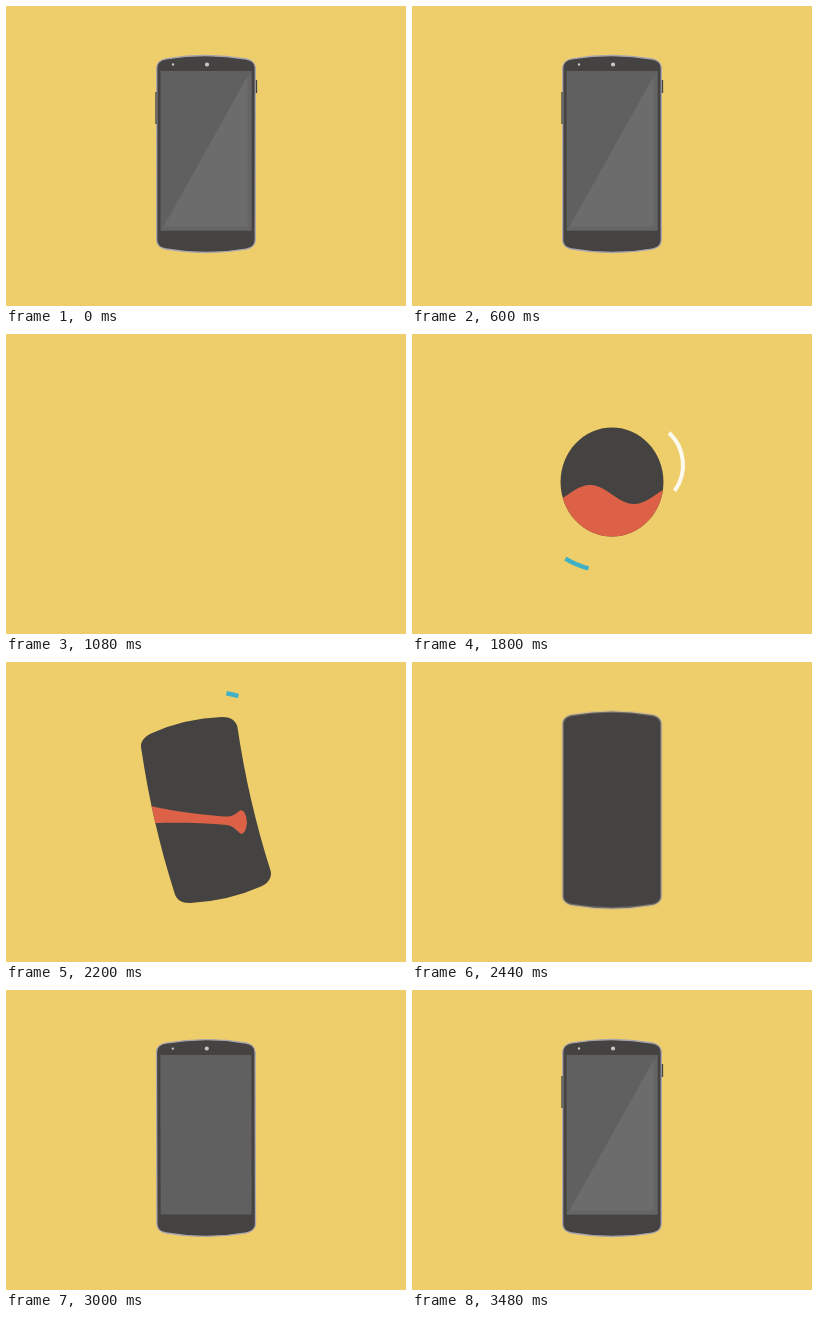
Recreate the animation shown at these times as an HTML page with a canvas. Size 400 by 300 pixels, loop 3600 ms.

```html
<!DOCTYPE html>
<html>
<head>
<meta charset="utf-8">
<style>
html, body { margin: 0; height: 100%; overflow: hidden; background: #eece6b; }
canvas { display: block; }
</style>
</head>
<body>
<canvas id="stage" width="400" height="300"></canvas>
<script>
const ctx = document.getElementById('stage').getContext('2d');
const LOOP = 3600, STEP = 40;
const DARK = '#454341', RED = '#dd6147', BLUE = '#3fb0c6', WHITE = '#fcf9ee';
const { PI, sin, cos, exp, sqrt, max, min, abs } = Math;
const rad = PI / 180;

const span = (t, a, b) => min(1, max(0, (t - a) / (b - a)));
const mix = (a, b, p) => a + (b - a) * p;
const smooth = p => p * p * (3 - 2 * p);
const easeOut = p => 1 - (1 - p) ** 3;

const morphAt = t => smooth(span(t, 1800, 2200));

// Ball falls in and squashes, then morphs into a body that swings to rest.
function pose(t) {
  const land = span(t, 1320, 1520), grow = mix(.17, 1, land);
  const settle = max(0, t - 1520);
  const squash = .2 * exp(-settle / 90) * sin(settle / 45);
  const m = morphAt(t);
  const swing = m * cos((t - 2200) / 480 * PI) * 10 ** ((2200 - t) / 480);
  const ballW = 51.5 * grow * (1 + squash), ballH = 54.5 * grow * (1 - squash);
  const corner = 9 + 4 * max(0, swing);
  return {
    y: 148 - 133 * (1 - land ** 2),
    w: mix(ballW, 49.3, m),
    h: mix(ballH, 95 - 8 * swing, m),
    rx: mix(ballW, corner, m),
    ry: mix(ballH, corner, m),
    bulge: 3.5 * m,
    angle: -13 * swing,
    sway: 4 * swing
  };
}

function bodyPath({ w, h, rx, ry, bulge, sway }) {
  const k = .448, x = w - rx, y = h - ry;
  const lip = h - (1 - k) * rx * 2 * bulge / (x + .01);
  const cx = w - rx * k, cy = h - ry * k;
  ctx.beginPath();
  ctx.moveTo(-x, -h);
  ctx.quadraticCurveTo(0, -h - 2 * bulge, x, -h);
  ctx.bezierCurveTo(cx, -lip, w, -cy, w, -y);
  ctx.bezierCurveTo(w - sway, -y / 3, w - sway, y / 3, w, y);
  ctx.bezierCurveTo(w, cy, cx, lip, x, h);
  ctx.quadraticCurveTo(0, h + 2 * bulge, -x, h);
  ctx.bezierCurveTo(-cx, lip, -w, cy, -w, y);
  ctx.bezierCurveTo(-w - sway, y / 3, -w - sway, -y / 3, -w, -y);
  ctx.bezierCurveTo(-w, -cy, -cx, -lip, -x, -h);
  ctx.closePath();
}

// A sine-topped pool that narrows to a flared band and retracts to the left.
function liquid(t) {
  const m = morphAt(t);
  const level = 160.5 - 90 * (1 - span(t, 1560, 1800));
  const end = 241 - 105 * span(t, 2200, 2360);
  const edges = x => {
    const wave = level + 9.5 * sin((x - 200) / 44 * PI);
    const cap = sqrt(max(0, 1 - max(0, (x - end + 8) / 8) ** 2));
    const flare = 4.5 * max(0, (241 - x) / 95) ** 3 + 9 * exp(-(((x - end + 3) / 9) ** 2));
    const half = (4 + flare) * cap, mid = 153 + .08 * (x - 148);
    return [mix(wave, mid - half, m), mix(215, mid + half, m)];
  };
  ctx.fillStyle = RED;
  ctx.beginPath();
  for (let x = 135; x <= 265; x++) ctx.lineTo(x, edges(x)[0]);
  for (let x = 265; x >= 135; x--) ctx.lineTo(x, edges(x)[1]);
  ctx.fill();
}

function dot(x, y, r, color) {
  ctx.fillStyle = color;
  ctx.beginPath();
  ctx.arc(x, y, r, 0, 7);
  ctx.fill();
}

function arc(x, y, r, mid, half, width, color, alpha = 1) {
  if (half <= 0) return;
  ctx.globalAlpha = alpha;
  ctx.strokeStyle = color;
  ctx.lineWidth = width;
  ctx.beginPath();
  ctx.arc(x, y, r, (mid - half) * rad, (mid + half) * rad);
  ctx.stroke();
  ctx.globalAlpha = 1;
}

function ring(p, x, y, r, width, color, strength) {
  if (p > 0 && p < 1) arc(x, y, r * easeOut(p), 0, 180, width * (1 - p), color, strength * (1 - p));
}

function triangle(x0, y0, x1, y1, color) {
  ctx.fillStyle = color;
  ctx.beginPath();
  ctx.moveTo(x1, y0);
  ctx.lineTo(x1, y1);
  ctx.lineTo(x0, y1);
  ctx.fill();
}

// Outline, screen, camera, gloss and buttons, in the phone's own coordinates.
function details(t) {
  ctx.globalAlpha = span(t, 2360, 2560);
  ctx.strokeStyle = '#aaa6b0';
  ctx.lineWidth = mix(2.5, 1.3, span(t, 2600, 3000));
  ctx.stroke();
  ctx.globalAlpha = 1;

  ctx.fillStyle = '#606060';
  ctx.fillRect(-45.5, -83, 91, 159.5 * easeOut(span(t, 2440, 2890)));
  dot(1, -89.5, 2.1 * span(t, 2650, 2800), '#c6c6c6');
  dot(-33, -89.5, 1.2 * span(t, 2760, 2920), '#c6c6c6');

  ctx.globalAlpha = span(t, 3000, 3360);
  triangle(-45.5, -83, 45.5, 76.5, '#656565');
  triangle(-42, -78, 41.5, 72.5, '#6c6c6c');
  ctx.globalAlpha = 1;

  const out = 2 * easeOut(span(t, 3040, 3240));
  if (out) {
    ctx.fillStyle = DARK;
    ctx.fillRect(-48.7 - out, -62, 1.3, 32);
    ctx.fillRect(47.8 + out, -74, 1.3, 13);
  }
}

function body(t, drop = 0) {
  const p = pose(t);
  ctx.save();
  ctx.translate(200, p.y + drop);
  ctx.rotate(p.angle * rad);
  bodyPath(p);
  ctx.fillStyle = DARK;
  ctx.fill();
  if (t >= 2360) details(t);
  else {
    ctx.clip();
    ctx.resetTransform();
    liquid(t);
  }
  ctx.restore();
}

function swooshes(t) {
  const k = span(t, 1640, 1960);
  arc(227, 131, 44, 179 * k - 95, 41.5 * sin(PI * k), 4, WHITE);

  const turn = (t - 1800) / 400;
  const r = 90.5 + 27 * turn + 12 * abs(sin(PI * turn));
  arc(200, 147, r, 113 + 170 * turn, min((t - 1720) / 10, 8 - 5 * turn), 4.5, BLUE);
}

function sparks(t) {
  ring(span(t, 2480, 2880), 245, 73, 61.7, 12, '#e6e4e2', 1.1);
  const p = span(t, 2440, 2920);
  dot(mix(173, -8, p), 159, 7.2 * sin(PI * p), BLUE);
  dot(93.5, 187, max(0, sin(PI * span(t, 2600, 2720))), '#b3a768');
}

function draw(t) {
  ctx.fillStyle = '#eece6b';
  ctx.fillRect(0, 0, 400, 300);
  if (t < 1080) {
    const lift = 9 * sin(span(t, 600, 680) * PI / 2);
    body(LOOP, 265 * span(t, 680, 1080) ** 1.62 - lift);
  } else if (t >= 1320) {
    swooshes(t);
    sparks(t);
    body(t);
    ring(span(t, 2560, 2800), 149, 239, 26.9, 4, BLUE, .65);
  }
}

const start = performance.now();
function tick() {
  const t = (performance.now() - start) % LOOP;
  draw(Math.floor(t / STEP) * STEP);
  requestAnimationFrame(tick);
}
tick();
</script>
</body>
</html>
```
